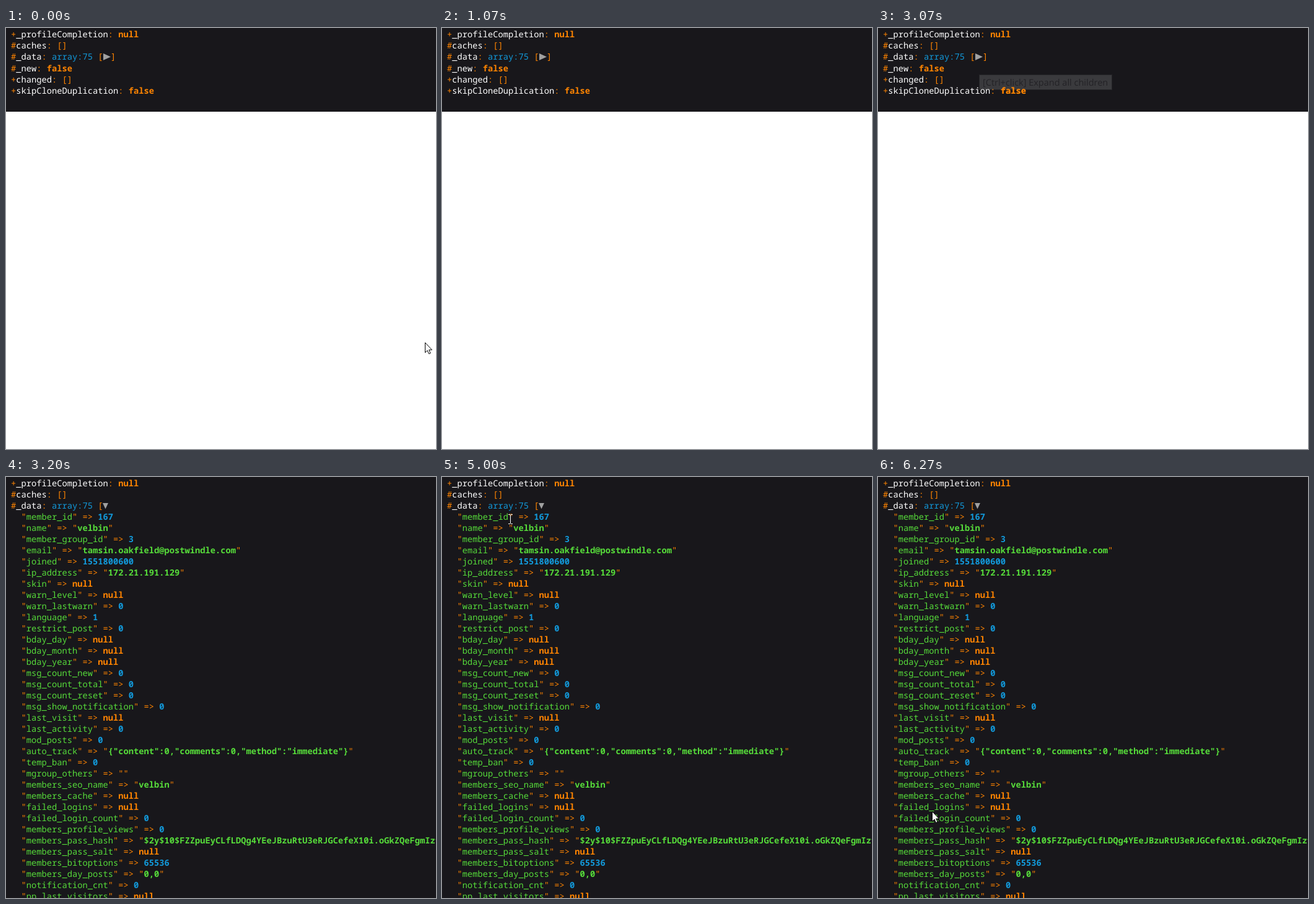
Recreate the animation shown at these times as an HTML page with a canvas. Size 694x679 px, loop 7.27 s.

```html
<!DOCTYPE html>
<html lang="en">
<head>
<meta charset="utf-8">
<title>Variable dump</title>
<style>
html, body { margin: 0; width: 100%; height: 100%; overflow: hidden; background: #fff; }
canvas { display: block; }
</style>
</head>
<body>
<canvas id="stage" width="694" height="679"></canvas>
<script>
const W = 694, H = 679, LOOP = 7270;
const ctx = document.getElementById('stage').getContext('2d');
const MONO = '13.75px "Noto Sans Mono", "DejaVu Sans Mono", monospace';
const CHAR = 8.25, LEFT = 8;
const DARK = '#18171b', ORANGE = '#ff8400', BLUE = '#1299da', GREEN = '#56db3a', WHITE = '#fff';

const data = [
  ['member_id', 167],
  ['name', 'velbin'],
  ['member_group_id', 3],
  ['email', 'tamsin.oakfield@postwindle.com'],
  ['joined', 1551800600],
  ['ip_address', '172.21.191.129'],
  ['skin', null],
  ['warn_level', null],
  ['warn_lastwarn', 0],
  ['language', 1],
  ['restrict_post', 0],
  ['bday_day', null],
  ['bday_month', null],
  ['bday_year', null],
  ['msg_count_new', 0],
  ['msg_count_total', 0],
  ['msg_count_reset', 0],
  ['msg_show_notification', 0],
  ['last_visit', null],
  ['last_activity', 0],
  ['mod_posts', 0],
  ['auto_track', '{"content":0,"comments":0,"method":"immediate"}'],
  ['temp_ban', 0],
  ['mgroup_others', ''],
  ['members_seo_name', 'velbin'],
  ['members_cache', null],
  ['failed_logins', null],
  ['failed_login_count', 0],
  ['members_profile_views', 0],
  ['members_pass_hash', '$2y$10$FZZpuEyCLfLDQg4YEeJBzuRtU3eRJGCefeX10i.oGkZQeFgmIzt'],
  ['members_pass_salt', null],
  ['members_bitoptions', 65536],
  ['members_day_posts', '0,0'],
  ['notification_cnt', 0],
  ['pp_last_visitors', null]
];

// Each part is [text, colour, bold]; columns follow from the text lengths.
function line(y, parts, col = 0) {
  for (const [text, color, bold] of parts) {
    ctx.font = (bold ? 'bold ' : '') + MONO;
    ctx.fillStyle = color;
    ctx.fillText(text, LEFT + col * CHAR, y);
    col += text.length;
  }
}

function property(y, mark, name, value, bold) {
  line(y, [[mark, ORANGE], [name, WHITE], [': ', ORANGE], [value, ORANGE, bold]]);
}

function polygon(points) {
  ctx.beginPath();
  points.forEach(([x, y]) => ctx.lineTo(x, y));
  ctx.closePath();
}

function triangle(points) {
  polygon(points);
  ctx.fillStyle = '#a0a0a0';
  ctx.fill();
}

function drawHead() {
  property(15, '+', '_profileCompletion', 'null', true);
  property(33, '#', 'caches', '[]');
  line(51, [['#', ORANGE], ['_data', WHITE], [': ', ORANGE], ['array:75', BLUE], [' [', ORANGE]]);
}

function drawCollapsed() {
  ctx.fillStyle = DARK;
  ctx.fillRect(0, 0, W, 135);
  drawHead();
  triangle([[157, 41], [169, 46.5], [157, 52]]);
  ctx.font = MONO;
  ctx.fillStyle = ORANGE;
  ctx.fillText(']', 169, 51);
  property(70, '#', '_new', 'false', true);
  property(88, '+', 'changed', '[]');
  property(106, '+', 'skipCloneDuplication', 'false', true);
}

function valueParts(value) {
  if (value === null) return [['null', ORANGE, true]];
  if (typeof value === 'number') return [[String(value), BLUE, true]];
  return [['"', ORANGE], [value, GREEN, true], ['"', ORANGE]];
}

function drawExpanded() {
  ctx.fillStyle = DARK;
  ctx.fillRect(0, 0, W, H);
  drawHead();
  triangle([[156, 42], [165, 42], [160.5, 51.5]]);
  data.forEach(([key, value], i) => {
    line(69 + i * 18, [['"', ORANGE], [key, GREEN], ['" => ', ORANGE], ...valueParts(value)], 2);
  });
}

function drawTooltip(alpha) {
  ctx.save();
  ctx.globalAlpha = alpha;
  ctx.fillStyle = '#767676';
  ctx.fillRect(163, 75, 215, 1);
  ctx.fillRect(163, 99, 215, 1);
  ctx.fillRect(163, 76, 1, 23);
  ctx.fillRect(377, 76, 1, 23);
  ctx.fillStyle = '#fff';
  ctx.fillRect(164, 76, 213, 23);
  ctx.restore();
  ctx.font = '14.5px "Open Sans", "Noto Sans", sans-serif';
  ctx.fillStyle = '#232226';
  ctx.fillText('[Ctrl+click] Expand all children', 169, 93);
  // The value below stays readable through the fading tooltip.
  line(106, [['false', ORANGE, true]], 23);
}

function arrow([x, y]) {
  ctx.save();
  ctx.translate(Math.round(x) + 0.5, Math.round(y) + 0.5);
  polygon([[0, 0], [0, 16], [3.6, 12.6], [6, 18], [8.6, 17], [6.2, 11.6], [11, 11.6]]);
  ctx.fillStyle = '#fff';
  ctx.fill();
  ctx.strokeStyle = '#000';
  ctx.lineWidth = 1;
  ctx.stroke();
  ctx.restore();
}

function beam([cx, cy]) {
  const x = Math.round(cx), y = Math.round(cy);
  ctx.fillStyle = '#fff';
  ctx.fillRect(x, y - 6, 1, 14);
  for (const edge of [y - 7, y + 8]) {
    ctx.fillRect(x - 3, edge, 3, 1);
    ctx.fillRect(x + 1, edge, 3, 1);
  }
}

function curve(a, b, c, u) {
  const v = 1 - u;
  return a.map((p, i) => v * v * p + 2 * u * v * b[i] + u * u * c[i]);
}

const smooth = u => u * u * (3 - 2 * u);
const stepAt = (t, start, size, last) => Math.min(last, Math.floor((t - start) / size + 0.001));

function drawPointer(t) {
  if (t < 130) {
    arrow([676, 507]);
  } else if (t < 870) {
    const k = stepAt(t, 130, 67, 10) + 1;
    arrow(curve([676, 507], [730, 420], [362, 133], smooth(k / 11)));
  } else if (t < 1070) {
    const k = stepAt(t, 870, 66.7, 2) + 1;
    arrow(curve([362, 133], [310, 60], [270, 30], k / 3));
  } else if (t >= 5000 && t < 5730) {
    const k = stepAt(t, 5000, 67, 10);
    beam(curve([110, 67], [12, 270], [118, 482], smooth(k / 10)));
  } else if (t >= 5730 && t < 6270) {
    const k = stepAt(t, 5730, 67.5, 7) + 1;
    beam(curve([118, 482], [155, 590], [87, 539], k / 9));
  } else if (t >= 6270) {
    arrow([87, 539]);
  }
}

function draw(t) {
  ctx.fillStyle = '#fff';
  ctx.fillRect(0, 0, W, H);
  if (t < 3200) {
    drawCollapsed();
    if (t >= 3070) drawTooltip(t < 3130 ? 0.15 : 0.19);
    if (t >= 3130) {
      ctx.fillStyle = '#2f6fb0';
      ctx.fillRect(0, 134, W, 1);
    }
  } else {
    drawExpanded();
  }
  drawPointer(t);
}

ctx.textBaseline = 'alphabetic';
ctx.textRendering = 'geometricPrecision';
const begin = performance.now();
function tick() {
  draw((performance.now() - begin) % LOOP);
  requestAnimationFrame(tick);
}
tick();
</script>
</body>
</html>
```
